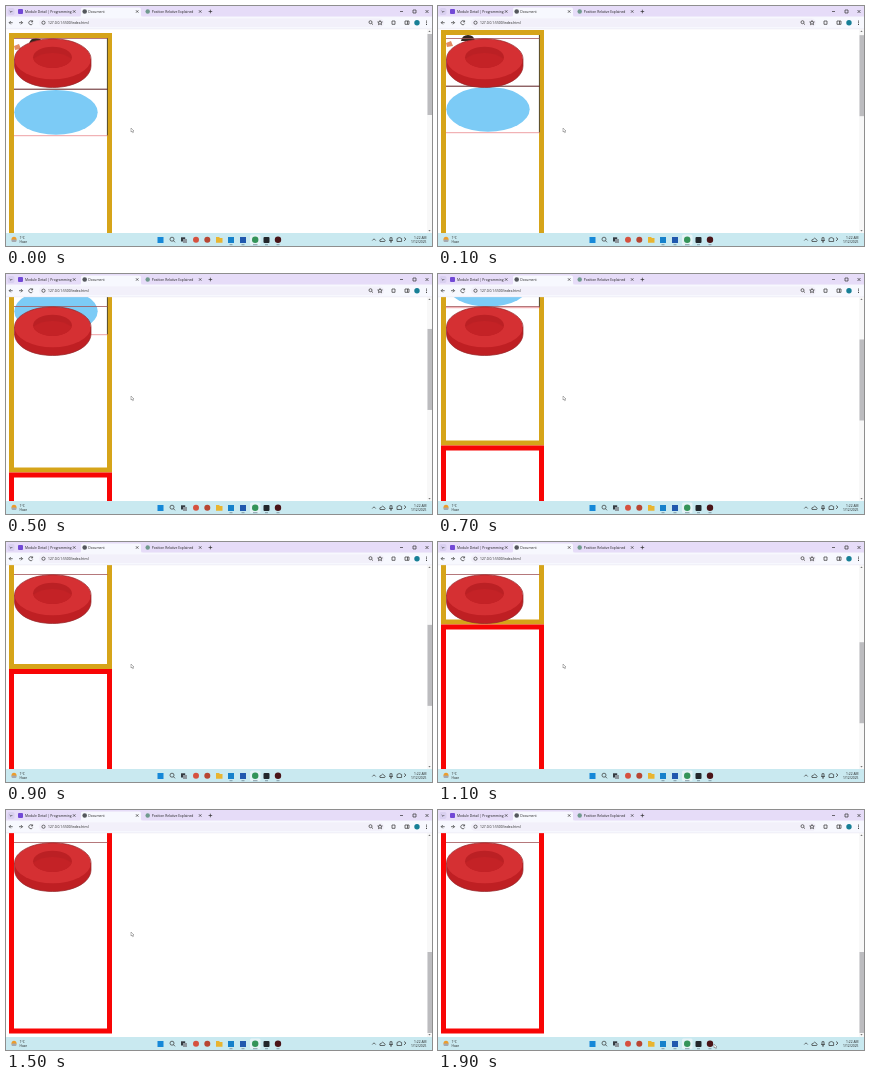
Animation of 426 by 240 pixels, one loop 2 s. Source, as an HTML page:

```html
<!DOCTYPE html>
<html lang="en">
<head>
<meta charset="utf-8">
<title>Document</title>
<style>
  html, body { margin: 0; width: 100%; height: 100%; overflow: hidden; background: #fff; }
  svg { display: block; width: 100vw; height: 100vh; }
  text { font: 3.35px "Open Sans", "Noto Sans", sans-serif; fill: #222; }
  .small { font-size: 3.3px; }
  .line { fill: none; stroke: #333; stroke-width: .7; }
</style>
</head>
<body>
<svg viewBox="0 0 426 240">
  <rect width="426" height="240" fill="#fff"/>

  <!-- Scrolled content -->
  <g id="content">
    <rect x="5.5" y="29.5" width="98" height="235.5" fill="#fff" stroke="#d6a419" stroke-width="5"/>
    <rect x="5.5" y="270" width="98" height="243" fill="#fff" stroke="#f80505" stroke-width="5"/>
    <g id="person">
      <path d="M23 38Q24 32 30 32Q36 32 37 38Z" fill="#33251f"/>
      <path d="M8 40L13 38L15 43L9 44Z" fill="#e38b62"/>
      <path d="M19 51L40 53L46 65L38 66L26 59Z" fill="#cf8258"/>
      <path d="M43 63Q51 57 61 63L58 68H46Z" fill="#45a9d5"/>
      <path d="M54 61L74 65L73 68L58 66Z" fill="#d88a60"/>
    </g>
    <ellipse cx="50" cy="106.3" rx="41.7" ry="22.4" fill="#7ccbf6"/>
    <path d="M101.4 32V129.5" stroke="#333" stroke-width=".8"/>
    <path d="M8 83.2H101.5" stroke="#5d1d20" stroke-width="1"/>
    <path d="M8 129.7H101.5" stroke="#e9888c" stroke-width=".8"/>
  </g>

  <!-- Pinned ring -->
  <path d="M8 32.5H101.5" stroke="#a3565a" stroke-width=".8"/>
  <g>
    <path d="M8.5 53V60C9 73 26 81.5 46.7 81.5S84.5 73 85 60V53Z" fill="#bf1f23"/>
    <ellipse cx="46.7" cy="53" rx="38.2" ry="20.2" fill="#d53033"/>
    <path d="M8.5 60V53C8.5 41.8 25.6 32.8 46.7 32.8S85 41.8 85 53V60C84.5 73 67 81.5 46.7 81.5S9 73 8.5 60Z" fill="none" stroke="#94272a" stroke-width=".7"/>
    <ellipse cx="46.5" cy="51.3" rx="19.4" ry="10.6" fill="#bb2024"/>
    <path d="M27.4 53Q34 47 46.5 47T65.6 53C63 59 55 62 46.5 62S30 59 27.4 53Z" fill="#c42226"/>
  </g>

  <!-- Scrollbar -->
  <rect x="421" y="23" width="5" height="204" fill="#f8f8f8"/>
  <path d="M422.3 26L423.5 24.5L424.7 26ZM422.3 224L423.5 225.5L424.7 224Z" fill="#777"/>
  <rect id="thumb" x="421.5" y="28" width="4.5" height="81" fill="#bcbcbf"/>

  <!-- Browser frame -->
  <rect width="426" height="11" fill="#e6dcf8"/>
  <rect y="10.5" width="426" height="12.5" fill="#f7f8fe"/>
  <path d="M0 22.8H426" stroke="#e4e2ee" stroke-width=".5"/>
  <path d="M73 11Q75 11 75 9V3Q75 1.5 77 1.5H133Q135 1.5 135 3V9Q135 11 137 11Z" fill="#f7f8fe"/>
  <rect x="1.5" y="2" width="7" height="7" rx="2" fill="#d9d0f0"/>
  <path class="line" d="M3.7 5L5 6.3L6.3 5"/>
  <rect x="12" y="3" width="5" height="5" rx="1" fill="#7249d6"/>
  <text x="19" y="6.8">Module Detail | Programming</text>
  <circle cx="78.7" cy="5.5" r="2.3" fill="#54575c"/>
  <text x="82.3" y="6.8">Document</text>
  <circle cx="141.7" cy="5.5" r="2.2" fill="#70998e"/>
  <text x="145.7" y="6.8">Position Relative Explained</text>
  <path class="line" d="M67 4.3L69.4 6.7M69.4 4.3L67 6.7M130 4.3L132.4 6.7M132.4 4.3L130 6.7M193 4.3L195.4 6.7M195.4 4.3L193 6.7M204.4 3.7V7.3M202.6 5.5H206.2"/>
  <path class="line" d="M394 5.5H397M407 4H410V7H407ZM419.5 4L422.5 7M422.5 4L419.5 7"/>
  <rect x="33" y="12.5" width="345" height="8.5" rx="4.2" fill="#f2f0fa"/>
  <path class="line" d="M6.7 16.7H3.2L4.8 15M3.2 16.7L4.8 18.3M13 16.7H16.5L14.9 15M16.5 16.7L14.9 18.3M26.5 15.7A2 2 0 1 0 26.6 17.6M26.6 14.4V15.9H25"/>
  <circle class="line" cx="37.5" cy="16.7" r="1.6"/>
  <text x="42" y="17.9">127.0.0.1:5500/index.html</text>
  <circle class="line" cx="364.5" cy="16.2" r="1.5"/>
  <path class="line" d="M365.6 17.3L367 18.7M374 14.5L374.8 16H376.3L375.1 17L375.5 18.7L374 17.8L372.5 18.7L372.9 17L371.7 16H373.2ZM386 15H389V18.3H386ZM399 15H403V18.3H399ZM401.5 15V18.3"/>
  <circle cx="411" cy="16.7" r="2.7" fill="#177f96"/>
  <path d="M420.5 14.6V19" stroke="#444" stroke-width="1" stroke-dasharray="1 .7"/>

  <!-- Taskbar -->
  <rect y="227" width="426" height="13" fill="#c9e9f0"/>
  <circle cx="8" cy="233.3" r="2.5" fill="#ed9c2b"/>
  <rect x="5.5" y="233.5" width="5" height="2.5" rx="1.2" fill="#a4a9b0"/>
  <text class="small" x="13.5" y="232.8">1°C</text>
  <text class="small" x="13.5" y="237.3">Haze</text>
  <rect x="151.5" y="231" width="6" height="6" fill="#1688d8"/>
  <circle class="line" cx="166" cy="233.2" r="2"/>
  <path class="line" d="M167.5 234.7L169 236.3"/>
  <rect x="175" y="231.3" width="4.2" height="4.2" fill="#343b42"/>
  <rect x="177" y="233" width="4" height="4" fill="#8e979e"/>
  <circle cx="190" cy="233.8" r="3" fill="#d6513f"/>
  <circle cx="201.3" cy="233.8" r="3" fill="#b84633"/>
  <path d="M210 231H213L214 232H216.5V236.8H210Z" fill="#e9b530"/>
  <rect x="222" y="231" width="6" height="6" fill="#1681cb"/>
  <rect x="234" y="231" width="6" height="6" fill="#2058ae"/>
  <rect x="244" y="228.5" width="10.5" height="10.5" rx="1.5" fill="#e5f3f6"/>
  <circle cx="249.2" cy="233.8" r="3.2" fill="#359459"/>
  <rect x="257.5" y="231" width="6" height="6" rx="1" fill="#22262b"/>
  <circle cx="272" cy="233.8" r="3.2" fill="#4a1418"/>
  <path d="M223.5 238.7H226.5M235.5 238.7H238.5M247 238.7H251.5M259 238.7H262M270.5 238.7H273.5" stroke="#657a88" stroke-width=".7"/>
  <path class="line" d="M366.3 234.5L368 232.8L369.7 234.5M374 235.5Q373 233.5 375.3 233.3Q376.5 231 378.2 233.3Q380 234 378.6 235.5ZM384 231.7H386V234.5H384ZM383 234Q385 237 387 234M385 235.5V237M391 232.5Q393.3 230.5 395.6 232.5V235.5H391ZM398 235L400 233L398 231.5"/>
  <text class="small" x="420.5" y="232.8" text-anchor="end">1:22 AM</text>
  <text class="small" x="420.5" y="237.3" text-anchor="end">1/12/2025</text>

  <path id="cursor" d="M0 0V4L1 3.2L1.7 4.7L2.4 4.4L1.8 3H3Z" fill="#fff" stroke="#555" stroke-width=".4"/>
</svg>
<script>
  const LOOP = 2000, STEP = 100, MAX_SCROLL = 292, THUMB_TRAVEL = 114;
  const scrollKeys = [[0, 0], [100, 3], [300, 30], [500, 69], [700, 96], [1100, 185], [1500, MAX_SCROLL]];
  const cursorX = [[1500, 125], [1800, 292], [1900, 276]];
  const cursorY = [[1500, 122], [1800, 212], [1900, 234]];
  const [content, thumb, cursor] = ["content", "thumb", "cursor"].map(id => document.getElementById(id));

  function valueAt(keys, time) {
    if (time <= keys[0][0]) return keys[0][1];
    for (let i = 1; i < keys.length; i++) {
      const [t0, v0] = keys[i - 1], [t1, v1] = keys[i];
      if (time <= t1) return v0 + (v1 - v0) * (time - t0) / (t1 - t0);
    }
    return keys[keys.length - 1][1];
  }

  const start = performance.now();
  function draw(now) {
    const time = Math.floor(Math.max(0, now - start) % LOOP / STEP) * STEP;
    const scroll = valueAt(scrollKeys, time);
    content.setAttribute("transform", `translate(0 ${-scroll})`);
    thumb.setAttribute("y", 28 + scroll / MAX_SCROLL * THUMB_TRAVEL);
    cursor.setAttribute("transform", `translate(${valueAt(cursorX, time)} ${valueAt(cursorY, time)})`);
    requestAnimationFrame(draw);
  }
  draw(start);
</script>
</body>
</html>
```
